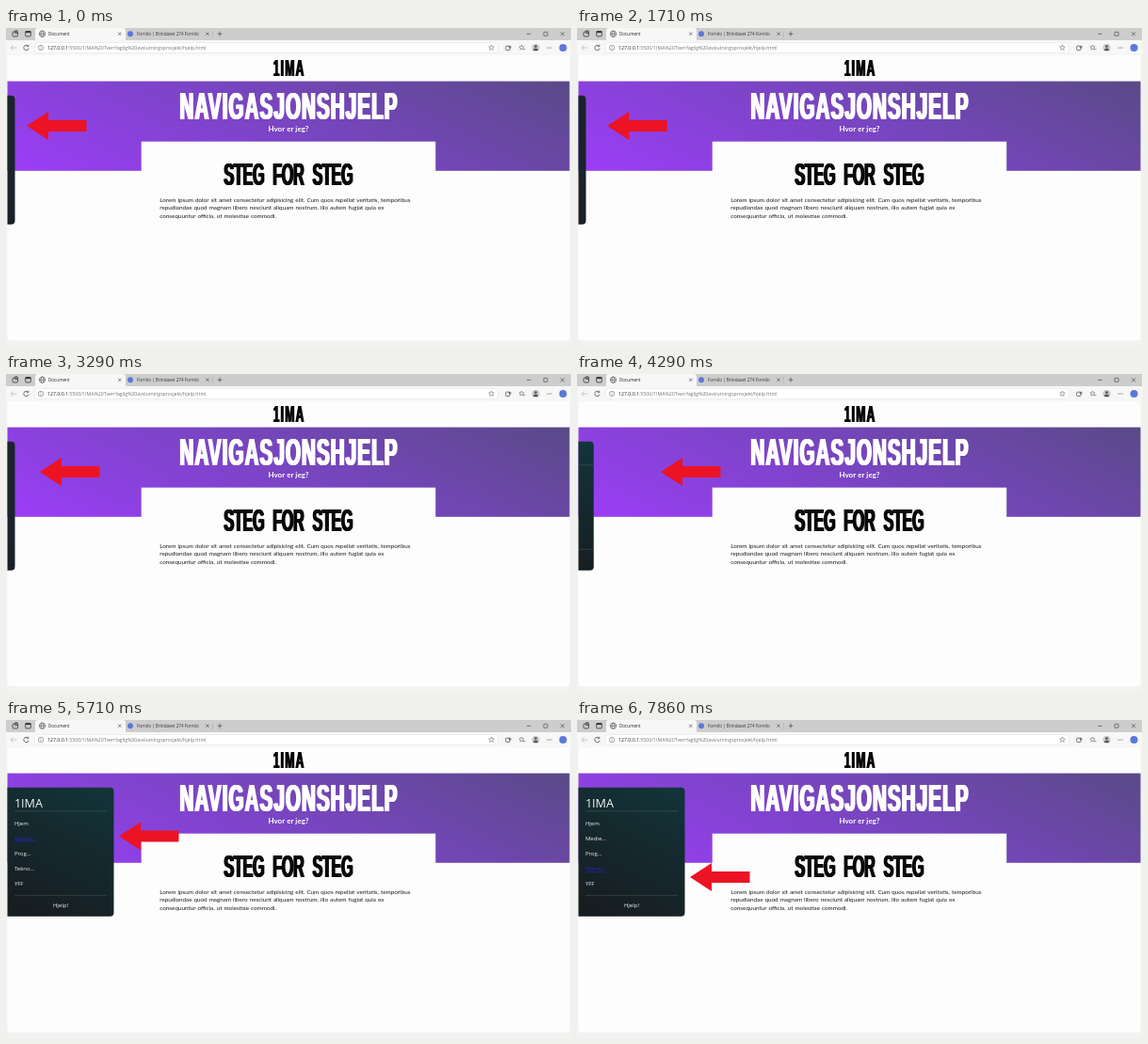
Animation, 600 px wide and 338 px high, one loop 8 s. Source, as an HTML page with a canvas:

```html
<!DOCTYPE html>
<html lang="no">
<head>
<meta charset="utf-8">
<title>Navigasjonshjelp</title>
<style>
  html, body { margin: 0; width: 100%; height: 100%; overflow: hidden; background: #f2f2f2; }
  canvas { display: block; width: 600px; height: 338px; }
</style>
</head>
<body>
<canvas id="stage"></canvas>
<script>
const W = 600, H = 338, LOOP = 8000, FPS = 7;
const UI = '"Open Sans", "Noto Sans", sans-serif';
const BODY = 'Lato, "Open Sans", sans-serif';
const HEAD = '"Liberation Sans", Arial, sans-serif';
const CONDENSE = 0.5;
const MENU = ['Hjem', 'Medie...', 'Prog...', 'Tekno...', 'YFF'];
const LOREM = [
  'Lorem ipsum dolor sit amet consectetur adipisicing elit. Cum quos repellat veritatis, temporibus',
  'repudiandae quod magnam libero nesciunt aliquam nostrum, illo autem fugiat quia ex',
  'consequuntur officia, ut molestiae commodi.'
];

const canvas = document.getElementById('stage');
const ctx = canvas.getContext('2d');
const ratio = window.devicePixelRatio || 1;
canvas.width = W * ratio;
canvas.height = H * ratio;

const clamp = v => Math.max(0, Math.min(1, v));
const smooth = v => { v = clamp(v); return v * v * (3 - 2 * v); };

// Linear interpolation through [time, value] points
function track(t, points) {
  if (t <= points[0][0]) return points[0][1];
  for (let i = 1; i < points.length; i++) {
    const [t0, a] = points[i - 1], [t1, b] = points[i];
    if (t <= t1) return a + (b - a) * (t - t0) / (t1 - t0);
  }
  return points[points.length - 1][1];
}

function rect(x, y, w, h, fill) {
  ctx.fillStyle = fill;
  ctx.fillRect(x, y, w, h);
}

function round(x, y, w, h, r, fill, stroke) {
  ctx.beginPath();
  ctx.roundRect(x, y, w, h, r);
  if (fill) { ctx.fillStyle = fill; ctx.fill(); }
  if (stroke) { ctx.strokeStyle = stroke; ctx.stroke(); }
}

function disc(x, y, r, fill) {
  ctx.beginPath();
  ctx.arc(x, y, r, 0, 7);
  ctx.fillStyle = fill;
  ctx.fill();
}

function ring(x, y, r, color, from = 0, to = 2 * Math.PI) {
  ctx.beginPath();
  ctx.arc(x, y, r, from, to);
  ctx.strokeStyle = color;
  ctx.stroke();
}

function line(color, ...p) {
  ctx.beginPath();
  for (let i = 0; i < p.length; i += 2) ctx.lineTo(p[i], p[i + 1]);
  ctx.strokeStyle = color;
  ctx.stroke();
}

function text(str, x, y, font, color, align = 'left', wordGap = 0) {
  ctx.font = font;
  ctx.fillStyle = color;
  ctx.textAlign = align;
  ctx.wordSpacing = wordGap + 'px';
  ctx.fillText(str, x, y);
  ctx.wordSpacing = '0px';
}

// Heavy condensed display lettering
function headline(str, x, y, size, color, gap, wordGap = 0) {
  ctx.save();
  ctx.translate(x + gap / 2, y);
  ctx.scale(CONDENSE, 1);
  ctx.letterSpacing = gap / CONDENSE + 'px';
  for (const dx of [-0.048, 0, 0.048]) {
    text(str, dx * size, 0, `bold ${size}px ${HEAD}`, color, 'center', wordGap / CONDENSE);
  }
  ctx.restore();
}

function cross(x, y, r, color) {
  line(color, x - r, y - r, x + r, y + r);
  line(color, x - r, y + r, x + r, y - r);
}

function tabStrip() {
  rect(0, 0, W, 14, '#cdcdcd');
  round(31, 0, 96, 14, [3, 3, 0, 0], '#f8f7f8');
  ctx.lineWidth = 0.8;
  const ink = '#333';
  round(7, 4, 5.5, 5, 1.2, null, ink);
  ring(10.8, 4.2, 1.6, ink);
  round(20.7, 3.5, 5.6, 5.4, 1, null, ink);
  rect(20.7, 3.3, 5.6, 1.8, ink);
  ctx.lineWidth = 0.6;
  ring(38.5, 6.2, 3.2, '#444');
  line('#444', 35.3, 6.2, 41.7, 6.2);
  ctx.beginPath();
  ctx.ellipse(38.5, 6.2, 1.4, 3.2, 0, 0, 7);
  ctx.stroke();
  text('Document', 45, 8, `4.6px ${UI}`, '#222');
  cross(120.7, 6.2, 1.6, '#333');
  disc(132, 6.2, 3, '#5b78d8');
  text('Fornilo | Brindaset 274 Fornilo', 139, 8, `4.6px ${UI}`, '#333');
  cross(214, 6.2, 1.6, '#333');
  line('#aaa', 219.5, 3, 219.5, 10);
  line(ink, 224.5, 6.2, 229.5, 6.2);
  line(ink, 227, 3.7, 227, 8.7);
  line(ink, 553, 6.3, 557.5, 6.3);
  round(571, 4.3, 4, 4, 0.5, null, ink);
  cross(591, 6.3, 2, ink);
}

function toolbar() {
  rect(0, 13, W, 16, '#f7f7f7');
  ctx.lineWidth = 0.7;
  line('#b5b5b5', 11.5, 21, 5, 21);
  line('#b5b5b5', 7.8, 18.3, 5, 21, 7.8, 23.7);
  ring(21.5, 21, 2.7, '#444', 0.2, 5.5);
  line('#444', 23.8, 17.7, 23.8, 19.6, 21.8, 19.6);
  ctx.lineWidth = 0.5;
  round(30.5, 15.5, 492, 11, 3, '#fff', '#dedede');
  ring(37, 21, 2.7, '#555');
  line('#555', 37, 20.5, 37, 22.6);
  rect(36.7, 19.2, 0.6, 0.7, '#555');

  const host = '127.0.0.1';
  const font = `5.2px ${UI}`;
  text(host, 44, 22.9, font, '#222');
  text(':5500/1IMA%20Tverrfaglig%20avslutningsprosjekt/hjelp.html',
    44 + ctx.measureText(host).width, 22.9, font, '#737373');

  star(515.5, 21, 3);
  ctx.lineWidth = 0.7;
  round(530.7, 19.2, 4.3, 4.3, 0.8, null, '#444');
  ring(535.2, 20.2, 1, '#444');
  star(547.5, 20.8, 2.8);
  line('#444', 549, 22.5, 551.5, 22.5);
  disc(562.5, 21, 4, '#c9c9cd');
  disc(562.5, 19.6, 1.4, '#555');
  ctx.beginPath();
  ctx.arc(562.5, 24, 2.5, Math.PI, 0);
  ctx.fill();
  for (let i = -1; i < 2; i++) disc(577 + i * 2, 21, 0.55, '#444');
  disc(591.5, 21, 4, '#5b78d8');
}

function star(x, y, r) {
  ctx.lineWidth = 0.5;
  ctx.beginPath();
  for (let i = 0; i < 10; i++) {
    const a = -Math.PI / 2 + i * Math.PI / 5, d = i % 2 ? r * 0.45 : r;
    ctx.lineTo(x + d * Math.cos(a), y + d * Math.sin(a));
  }
  ctx.closePath();
  ctx.strokeStyle = '#555';
  ctx.stroke();
}

function page() {
  rect(0, 28, W, H - 28, '#f2f2f2');
  round(1.5, 29, 597, 303, [2, 2, 3, 3], '#fdfdfd');
  headline('1IMA', 300, 51, 24, '#080808', 1.3);

  const g = ctx.createLinearGradient(1.5, 152, 158.8, -162.8);
  g.addColorStop(0, '#9c3df8');
  g.addColorStop(0.5, '#7945c2');
  g.addColorStop(1, '#5a4a88');
  rect(1.5, 56.6, 597, 95.2, g);
  rect(143.7, 120.7, 312.5, 40, '#fdfdfd');

  headline('NAVIGASJONSHJELP', 300, 97, 41, '#fff', 1.15);
  text('Hvor er jeg?', 300, 110, `bold 8px ${BODY}`, '#fff', 'center');
  headline('STEG FOR STEG', 300, 166.6, 32.5, '#080808', -0.35, 4.8);
  LOREM.forEach((s, i) => text(s, 163.3, 184.8 + i * 8.5, `6.3px ${BODY}`, '#1c1c1c', 'left', 0.4));
}

function sidebar(open, hover) {
  const x = 1.5, y = 71.8, h = 137, w = 8 + 105 * open;
  const left = x + 7.4 * open, right = x + w - 7.5 * open;
  ctx.save();
  const g = ctx.createLinearGradient(x + w, y, x + w * 0.4, y + h);
  g.addColorStop(0, open > 0 ? '#12353a' : '#1a252b');
  g.addColorStop(0.5, open > 0 ? '#15292e' : '#1a252b');
  g.addColorStop(1, open > 0 ? '#171e22' : '#182127');
  round(x, y, w, h, [0, 4, 4, 0], g);
  ctx.clip();
  if (open > 0) {
    ctx.lineWidth = 0.6;
    line('rgba(150,165,168,.35)', left, 96.8, right, 96.8);
    line('rgba(150,165,168,.35)', left, 186.4, right, 186.4);
    ctx.globalAlpha = clamp((open - 0.15) / 0.6);
    const font = `500 6px ${UI}`;
    text('1IMA', left, 92.6, `500 12.6px ${UI}`, '#f4f6f6');
    MENU.forEach((s, i) => {
      const base = 111.6 + i * 16.2, on = i === hover;
      text(s, left, base, font, on ? '#2a22d8' : '#f0f3f3');
      if (on) rect(left, base + 0.8, ctx.measureText(s).width, 0.5, '#2a22d8');
    });
    text('Hjelp!', (left + right) / 2, 198.9, font, '#f0f3f3', 'center');
  }
  ctx.restore();
}

function arrow(x, y) {
  ctx.beginPath();
  ctx.moveTo(x, y);
  for (const [dx, dy] of [[23, -15], [23, -6], [63.5, -6], [63.5, 6], [23, 6], [23, 15]]) {
    ctx.lineTo(x + dx, y + dy);
  }
  ctx.closePath();
  ctx.fillStyle = '#ec1324';
  ctx.fill();
}

// Sways beside the closed drawer, then backs off as it opens
function arrowX(t) {
  const sway = s => 36 - 16 * Math.cos(0.505 + s * 2 * Math.PI / 1.515);
  const leave = 24 / FPS;
  return t <= leave ? sway(t) : track(t, [[leave, sway(leave)], [4.286, 89], [4.857, 120]]);
}

function draw(ms) {
  const t = Math.floor((ms % LOOP) * FPS / 1000 + 0.03) / FPS % (LOOP / 1000);
  const y = track(t, [[4.286, 104], [4.857, 108], [6.571, 139], [7.857, 167]]);
  const open = smooth((t - 4.158) / 0.742);
  const hover = open > 0.5 ? Math.floor((y - 101) / 17) : -1;

  ctx.setTransform(ratio, 0, 0, ratio, 0, 0);
  page();
  tabStrip();
  toolbar();
  sidebar(open, hover);
  arrow(arrowX(t), y);
}

const start = performance.now();
function tick() {
  draw(performance.now() - start);
  requestAnimationFrame(tick);
}
tick();
</script>
</body>
</html>
```
